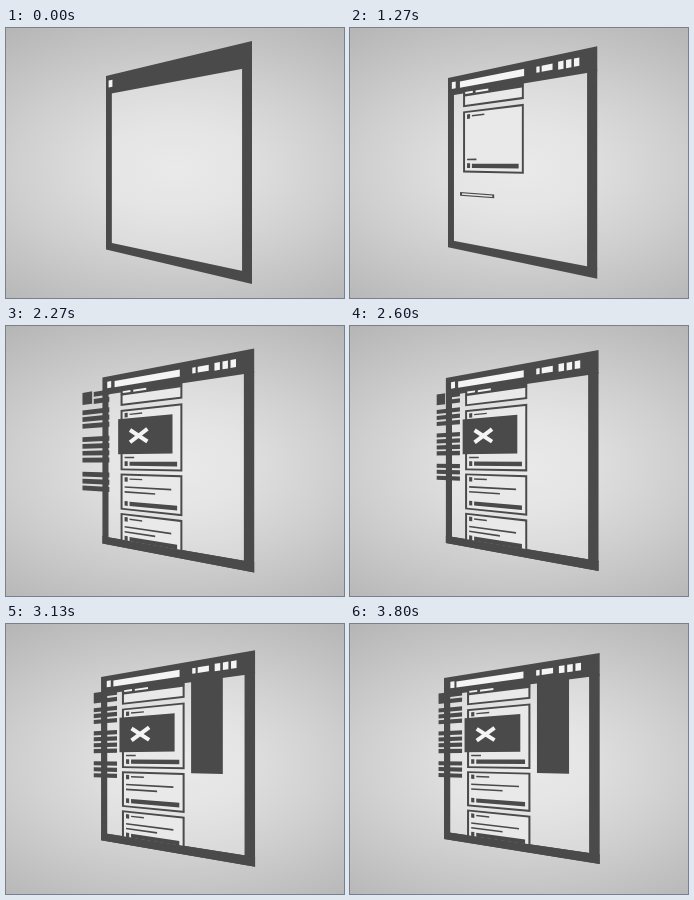
These frames come from a looping animation (338 by 270 pixels, 3.87 s). An HTML page with a canvas:

```html
<!DOCTYPE html>
<html lang="en">
<head>
<meta charset="utf-8">
<title>Page wireframe assembly</title>
<style>
html, body { margin: 0; width: 100%; height: 100%; overflow: hidden; background: #c0c0c0; }
canvas { display: block; width: 100vw; height: 100vh; filter: blur(.4px); }
</style>
</head>
<body>
<canvas id="stage" width="338" height="270"></canvas>
<script>
const ctx = document.getElementById('stage').getContext('2d');
const LOOP = 3870, STEP = 66.7, END = 3800;
const DARK = '#4a4a4a', LIGHT = '#e9e9e9', WHITE = '#f4f4f4';
const HEAD = 0.107, FLOOR = 0.955, LEFT = 0.148, RIGHT = 0.555;
let now = 0;

const lerp = (a, b, k) => a + (b - a) * k;
const progress = (from, to) => {
  const p = Math.max(0, Math.min(1, (now - from) / (to - from)));
  return 1 - (1 - p) ** 3;
};

// Page plane: s runs along the width, v down the height.
function point(s, v) {
  const k = now / END;
  const x = lerp(lerp(100, 94, k), lerp(246, 249.7, k), s);
  const top = lerp(lerp(48, 54, k), lerp(13, 29, k), s);
  const bottom = lerp(lerp(221.5, 215, k), lerp(256, 240, k), s);
  return [x, lerp(top, bottom, v)];
}

function plane(s0, v0, s1, v1, color) {
  ctx.fillStyle = color;
  ctx.beginPath();
  for (const [s, v] of [[s0, v0], [s1, v0], [s1, v1], [s0, v1]]) ctx.lineTo(...point(s, v));
  ctx.fill();
}

// A piece flies to its place, with its centre offset by (ds, dv) at the start.
// Pieces that start small open in width first, then in height.
function fly([s0, v0, s1, v1], from, to, { ds = 0, dv = 0, size = 0 } = {}) {
  if (now < from) return null;
  const k = progress(from, to);
  const drift = (now - END) / 1000 * 0.0185;
  const s = (s0 + s1) / 2 + ds * (1 - k) + drift;
  const v = (v0 + v1) / 2 + dv * (1 - k);
  const w = (s1 - s0) / 2 * lerp(size, 1, k);
  const h = (v1 - v0) / 2 * lerp(size, 1, size < 1 ? k ** 4 : k);
  return [s - w, v - h, s + w, v + h];
}

// Draws in fractions of a box.
const inside = box => (a0, b0, a1, b1, color = DARK) => plane(
  lerp(box[0], box[2], a0), lerp(box[1], box[3], b0),
  lerp(box[0], box[2], a1), lerp(box[1], box[3], b1), color);

function outlined(box) {
  const w = Math.min(0.013, (box[2] - box[0]) / 4);
  const h = Math.min(0.0105, (box[3] - box[1]) / 3.5);
  plane(...box, DARK);
  plane(box[0] + w, box[1] + h, box[2] - w, box[3] - h, LIGHT);
}

function background() {
  const g = ctx.createRadialGradient(0, 0, 0, 0, 0, 190);
  ['#e4e4e4', '#dddddd', '#cfcfcf', '#bfbfbf', '#afafaf']
    .forEach((c, i) => g.addColorStop(i / 4, c));
  ctx.save();
  ctx.translate(170, 140);
  ctx.scale(1.7, 1);
  ctx.fillStyle = g;
  ctx.fillRect(-170, -140, 340, 270);
  ctx.restore();
}

const pageFloor = () => plane(0, FLOOR, 1, 1, DARK);

function browser() {
  plane(0.04, HEAD, 0.932, FLOOR, 'rgba(255,255,255,.2)');
  plane(0, 0, 1, HEAD, DARK);
  plane(0, 0.1, 0.04, 0.96, DARK);
  plane(0.932, 0.1, 1, 0.96, DARK);
  pageFloor();
  const s = lerp(0.018, 0.041, now / END);
  plane(s, 0.03, s + 0.026, 0.069, WHITE);
  plane(0.08, 0.034, lerp(0.08, 0.51, progress(200, 530)), 0.07, WHITE);

  const icon = (mid, width, height, i) => {
    const k = progress(470 + i * 60, 670 + i * 60) / 2;
    plane(mid - width * k, 0.051 - height * k, mid + width * k, 0.051 + height * k, WHITE);
  };
  icon(0.603, 0.022, 0.029, 0);
  icon(0.664, 0.073, 0.029, 1);
  for (let i = 0; i < 3; i++) icon(0.756 + i * 0.053, 0.036, 0.037, i + 2);
}

function topBox() {
  const box = fly([LEFT, 0.115, RIGHT, 0.184], 700, 930);
  if (!box) return;
  outlined(box);
  const draw = inside(box), k = progress(870, 1070);
  draw(0, -0.25, 1, 0.05);
  draw(0.035, -0.21, lerp(0.035, 0.16, k), -0.05, WHITE);
  draw(0.205, -0.19, lerp(0.205, 0.415, k), -0.03, WHITE);
}

// Lines are pairs of height below the card top and right end.
function card(top, height, from, to, path, lines) {
  const box = fly([LEFT, top, RIGHT, top + height], from, to, path);
  if (!box) return;
  outlined(box);
  if (box[3] - box[1] < 0.05) return;
  const draw = inside(box), b = n => n / height;
  draw(0.065, b(0.02), 0.115, b(0.045));
  draw(0.145, b(0.026), 0.35, b(0.034));
  for (const [y, end] of lines) draw(0.065, b(y), end, b(y + 0.009));
  draw(0.065, 1 - b(0.052), 0.115, 1 - b(0.025));
  draw(0.145, 1 - b(0.05), 0.915, 1 - b(0.026));
}

function cards() {
  const text = [[0.072, 0.82], [0.1, 0.56]];
  card(0.208, 0.348, 900, 1300, { ds: -0.2 }, [[0.27, 0.22]]);
  card(0.575, 0.208, 1200, 1480, { ds: -0.25 }, text);
  card(0.803, 0.18, 1670, 1890, { ds: -1, dv: 0.3 }, text);
  if (now > 1890) pageFloor();
}

function picture() {
  const box = fly([0.132, 0.26, 0.49, 0.463], 1470, 1730);
  if (!box) return;
  plane(...box, DARK);
  const k = progress(1900, 2130);
  if (!k) return;
  const at = (a, b) => point(lerp(box[0], box[2], a), lerp(box[1], box[3], b));
  ctx.strokeStyle = WHITE;
  ctx.lineWidth = 4 * k;
  for (const d of [-1, 1]) {
    ctx.beginPath();
    ctx.moveTo(...at(0.378 - 0.16 * k, 0.5 + 0.17 * k * d));
    ctx.lineTo(...at(0.378 + 0.16 * k, 0.5 - 0.17 * k * d));
    ctx.stroke();
  }
}

function sidebar() {
  const box = fly([0.597, 0.1, 0.803, 0.576], 2730, 3000, { ds: 0.27, dv: 0.38, size: 1.5 });
  if (box) plane(...box, DARK);
}

function menu() {
  const box = fly([-0.035, 0.092, 0.116, 0.617], 2047, 2785, { ds: -0.16, dv: 0.075, size: 1.5 });
  if (!box) return;
  const draw = inside(box);
  const bars = (top, count, left = 0) => {
    for (let i = 0; i < count; i++) draw(left, top + i * 0.07, 1, top + i * 0.07 + 0.048);
  };
  draw(0, 0, 0.36, 0.125);
  bars(0.01, 2, 0.42);
  bars(0.18, 3);
  bars(0.455, 4);
  bars(0.81, 3);
}

function scene() {
  browser();
  topBox();
  cards();
  picture();
  sidebar();
  menu();
}

// Brief doubled view of the page corner: solid along its rim, faint within.
function flash() {
  if (now < 3320 || now > 3480) return;
  const copy = (x, y, w, h, alpha) => {
    ctx.save();
    ctx.beginPath();
    ctx.rect(x, y, w, h);
    ctx.clip();
    ctx.globalAlpha = alpha;
    ctx.transform(2, 0, 0, 2, -119.5, -76);
    scene();
    ctx.restore();
  };
  copy(56, 12, 125, 28, 1);
  copy(56, 40, 34, 95, 1);
  copy(90, 40, 91, 87, 0.55);
}

function frame() {
  const ms = performance.now() % LOOP;
  now = Math.min(57, Math.floor((ms + 5) / STEP)) * STEP;
  background();
  scene();
  flash();
  requestAnimationFrame(frame);
}
frame();
</script>
</body>
</html>
```
